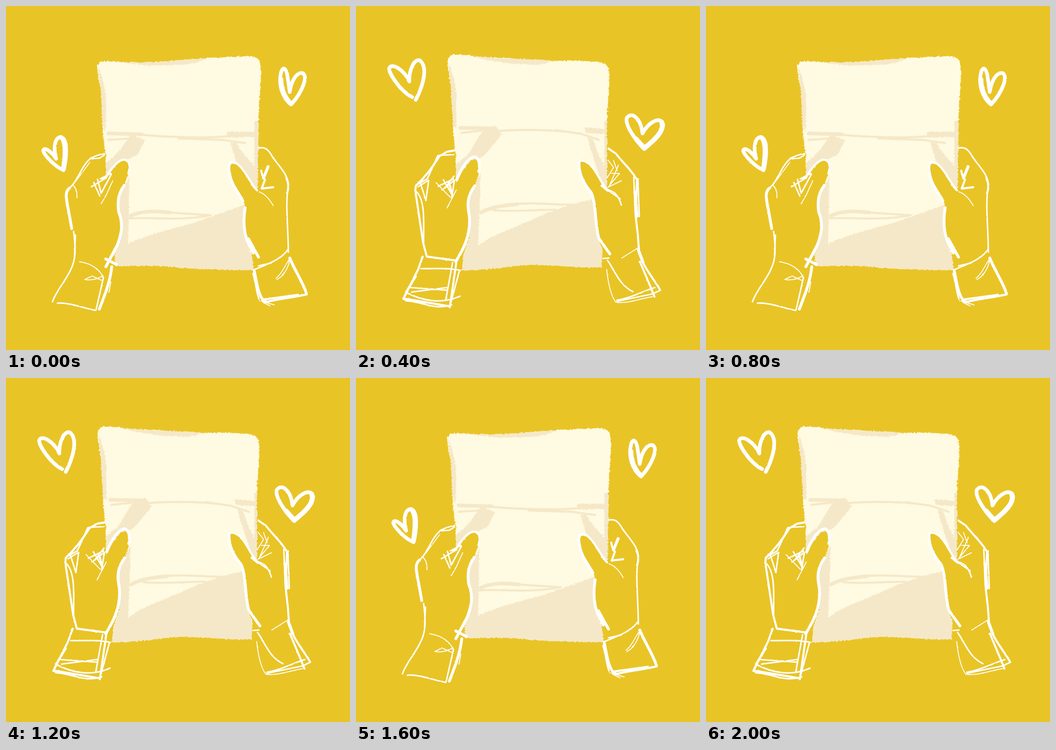
An HTML page that plays this animation: 748 by 748 pixels, repeating every 2.4 s.

```html
<!DOCTYPE html>
<html lang="en">
<head>
<meta charset="utf-8">
<title>Hands holding a letter</title>
<style>
  html, body { margin: 0; width: 100%; height: 100%; overflow: hidden; background: #e9c426; }
  svg { display: block; width: 100%; height: 100%; }
  .pose { animation: flip 800ms step-end infinite; }
  .second { animation-delay: -400ms; }
  @keyframes flip { 0% { visibility: visible; } 50% { visibility: hidden; } }

  .sheet { fill: #fffae2; filter: url(#chalk); }
  .shade { fill: #f5e8c8; }
  .fold, .ink { fill: none; stroke-linecap: round; stroke-linejoin: round; filter: url(#pencil); }
  .fold { stroke: #f5e8c8; }
  .ink { stroke: #fff; }
  .w2 { stroke-width: 2; }
  .w3 { stroke-width: 3.2; }
  .w4 { stroke-width: 4.4; }
  .w6 { stroke-width: 6.2; }
  .w8 { stroke-width: 8; }
  .w10 { stroke-width: 10.5; }
</style>
</head>
<body>
<svg viewBox="0 0 748 748">
  <defs>
    <filter id="chalk" filterUnits="userSpaceOnUse" x="0" y="0" width="748" height="748" color-interpolation-filters="sRGB">
      <feTurbulence type="fractalNoise" baseFrequency=".25" numOctaves="2" seed="4"/>
      <feDisplacementMap in="SourceGraphic" scale="6" xChannelSelector="R" yChannelSelector="G"/>
    </filter>
    <filter id="pencil" filterUnits="userSpaceOnUse" x="0" y="0" width="748" height="748" color-interpolation-filters="sRGB">
      <feTurbulence type="fractalNoise" baseFrequency=".16" numOctaves="2" seed="9"/>
      <feDisplacementMap in="SourceGraphic" scale="2" xChannelSelector="R" yChannelSelector="G"/>
    </filter>
  </defs>

  <g class="pose">
    <g class="sheet">
      <path d="M198 134Q199 121 213 120C245 119 285 125 325 122S395 116 440 113L525 109Q552 110 553 125C558 165 549 205 549 245L547 403
        L541 400C526 378 517 352 498 340C486 336 482 346 486 364C490 390 508 406 516 424C523 442 515 462 518 490C522 515 536 530 535 552L539 574
        C480 574 420 573 370 568S290 565 237 566L236 540C244 518 253 495 251 475C240 445 244 412 258 386C264 372 271 358 268 345
        Q258 330 246 338C232 350 222 362 217 379L217 322C207 280 211 235 208 200Z"/>
      <path class="shade" d="M242 120C280 125 330 122 380 118L440 113C415 124 400 128 370 128C330 130 300 132 242 120Z"/>
      <path class="shade" d="M201 134C212 155 219 195 218 225L216 275L209 255L207 195Z"/>
      <path class="shade" d="M272 280L303 291L287 322L268 333L250 334L217 372V342L240 322Z"/>
      <path class="shade" d="M488 295L502 298C512 320 530 336 540 347V250H549L547 403L541 400C528 375 515 350 500 338Z"/>
      <path class="shade" d="M480 274L548 273V285L482 286Z"/>
      <path class="shade" d="M268 372L266 517C300 500 345 488 400 474L455 455L519 432C516 470 518 500 535 545L539 574
        C480 574 420 573 370 568S290 565 237 566L236 540C262 485 238 450 246 415Z"/>
    </g>
    <g class="fold">
      <path class="w8" d="M223 277L295 279M271 456C300 444 325 446 355 449"/>
      <path class="w4" d="M223 291L270 288M295 280C350 285 430 288 485 283M375 288L470 291L520 298M355 449L445 455M268 462C310 458 370 468 440 456"/>
    </g>
    <g class="ink">
      <path class="w2" d="M146 390Q156 400 154 417M148 386L166 362L182 340M160 556C186 560 205 573 212 592M171 595L187 587L209 597
        M171 595Q195 598 211 586M207 430L218 411L232 380M228 600L224 622M550 404C565 409 574 422 581 434M587 592C600 582 608 562 617 549
        M589 595Q611 582 617 552M551 640L583 650M558 644L574 652"/>
      <path class="w3" d="M101 643C110 618 128 600 140 575C152 552 152 530 147 490M151 498L149 545M140 394C157 379 163 350 182 333Q195 324 214 321
        M186 332L203 331L214 324M191 384L204 413M199 377L207 407L229 366M186 393L219 373L205 376L228 364
        M112 646C140 645 165 656 195 662M196 660L212 590M549 309C564 305 572 314 580 329C595 350 615 368 614 392C607 425 613 470 614 535
        M538 574C570 561 601 550 614 528M549 565L576 559M537 582C544 603 544 622 550 637"/>
      <path class="w4" d="M218 372C230 350 245 335 256 334Q274 336 266 364M546 401C530 385 519 352 499 341
        M555 358Q557 371 563 378L556 397L581 394M654 627C620 635 590 637 565 644M562 638L635 628M610 376Q617 390 611 408"/>
      <path class="w6" d="M138 396C127 404 131 420 136 445L143 484M257 390C244 408 242 425 245 448C256 475 251 495 242 520L217 567
        M217 550L240 562M230 567C226 602 214 630 203 659M570 349L560 374M498 341C486 336 482 346 486 364C490 390 506 405 515 424
        M520 438C515 470 518 495 526 514L538 537M527 506L549 546M617 548C628 575 645 600 653 624M540 577C545 601 549 635 564 643"/>
      <path class="w8" d="M620 214C601 201 592 170 598 145C602 130 609 135 612 152L617 187C620 165 631 143 645 146C658 152 644 188 620 214Z
        M125 357C108 350 84 326 81 315C82 306 96 313 109 332C102 306 107 284 120 285C136 290 131 335 125 357Z"/>
      <path class="w10" d="M598 160C597 180 608 202 619 212M119 286C132 290 129 330 125 354"/>
    </g>
  </g>

  <g class="pose second">
    <g class="sheet">
      <path d="M199 124Q199 105 216 105C245 105 265 112 300 112S350 116 395 119S460 115 525 122Q548 124 550 140C553 175 546 215 546 250L546 402
        L540 396C525 372 514 344 496 335C484 333 482 342 485 360C490 385 507 396 513 412C524 440 516 475 528 508L536 530L534 568
        C490 570 440 564 390 563S330 572 230 575L235 535C246 510 250 485 249 462C240 435 246 412 259 390C266 372 272 350 267 337
        Q259 324 246 335C232 350 222 365 217 386L217 320C208 280 212 230 208 190Z"/>
      <path class="shade" d="M250 108C290 114 350 114 425 118C415 128 395 129 370 127C330 125 295 122 250 108Z"/>
      <path class="shade" d="M202 126C212 150 220 180 218 215L218 265L211 262L207 195Z"/>
      <path class="shade" d="M276 270L303 260L317 279L286 317L272 330L250 335L217 376V344L241 326Z"/>
      <path class="shade" d="M503 286L515 289C523 315 532 332 540 347V250H546V402L538 392C528 365 515 330 503 286Z"/>
      <path class="shade" d="M495 264L546 268V279L500 276Z"/>
      <path class="shade" d="M271 364L266 521C300 495 345 483 400 457C440 439 480 428 516 420C519 460 518 490 536 530L534 568
        C490 570 440 564 390 563S330 572 230 575L235 535C262 485 236 450 248 412Z"/>
    </g>
    <g class="fold">
      <path class="w8" d="M227 265L300 266M272 449C290 439 310 435 350 431"/>
      <path class="w4" d="M229 276L273 271M310 272C350 268 410 269 455 273M435 270L490 278L528 291M345 431C385 426 430 433 480 432M298 444C340 448 380 443 434 443"/>
    </g>
    <g class="ink">
      <path class="w2" d="M174 384L205 416M578 548L613 526M545 573C548 600 554 630 565 644C590 648 615 637 645 632M198 439L218 400
        M548 335L560 351L546 374M571 346L550 393M577 380L548 394M555 364H573L553 388M560 336L568 358"/>
      <path class="w3" d="M132 404C151 425 147 470 147 515M130 390L155 376L178 325L213 323M140 385L152 423L158 379L135 393
        M190 378L210 412M179 392L212 376M187 400L214 379L208 417M213 370L193 396M141 571C170 572 200 568 227 575
        M116 612L198 618M108 622C140 640 185 650 226 631M108 641C145 643 170 662 208 650M121 622L200 612M210 558L195 640M225 575L207 642
        M545 400C560 400 571 412 577 433M551 403L574 419M537 549L550 548M547 553C564 578 573 607 602 621
        M567 640C600 634 622 621 650 612M568 642L645 626L662 618M604 372L607 451M613 376L616 458"/>
      <path class="w4" d="M215 314L197 317L181 327C170 345 155 368 130 391L129 402L146 515L154 545L215 553
        M145 545L135 573L106 631M130 588L110 620M103 636L204 653M218 558L204 655M108 626L103 637L152 645
        M549 310L565 321C584 345 600 358 611 378L608 455L613 500L616 540M485 341C486 332 503 335 518 356C528 371 537 390 546 400
        M613 530C625 570 646 590 661 617M617 555L638 605L649 632M204 390L210 414"/>
      <path class="w6" d="M219 378C230 350 246 328 258 328Q272 333 267 360M258 391C245 410 241 425 245 448C251 475 243 508 231 531L217 556
        M485 341C484 365 494 385 511 405C523 430 519 475 528 505L552 539M607 404L611 457M616 535L624 557M535 391L548 401"/>
      <path class="w8" d="M122 198C96 185 72 147 72 136C77 122 104 138 116 164C115 138 127 116 138 118C155 129 150 165 130 204
        M627 311C605 290 584 256 589 243C599 229 619 243 623 277C635 255 655 242 666 252C675 270 645 295 627 311Z"/>
      <path class="w10" d="M609 289L627 309C645 295 672 272 665 254"/>
    </g>
  </g>
</svg>
</body>
</html>
```
